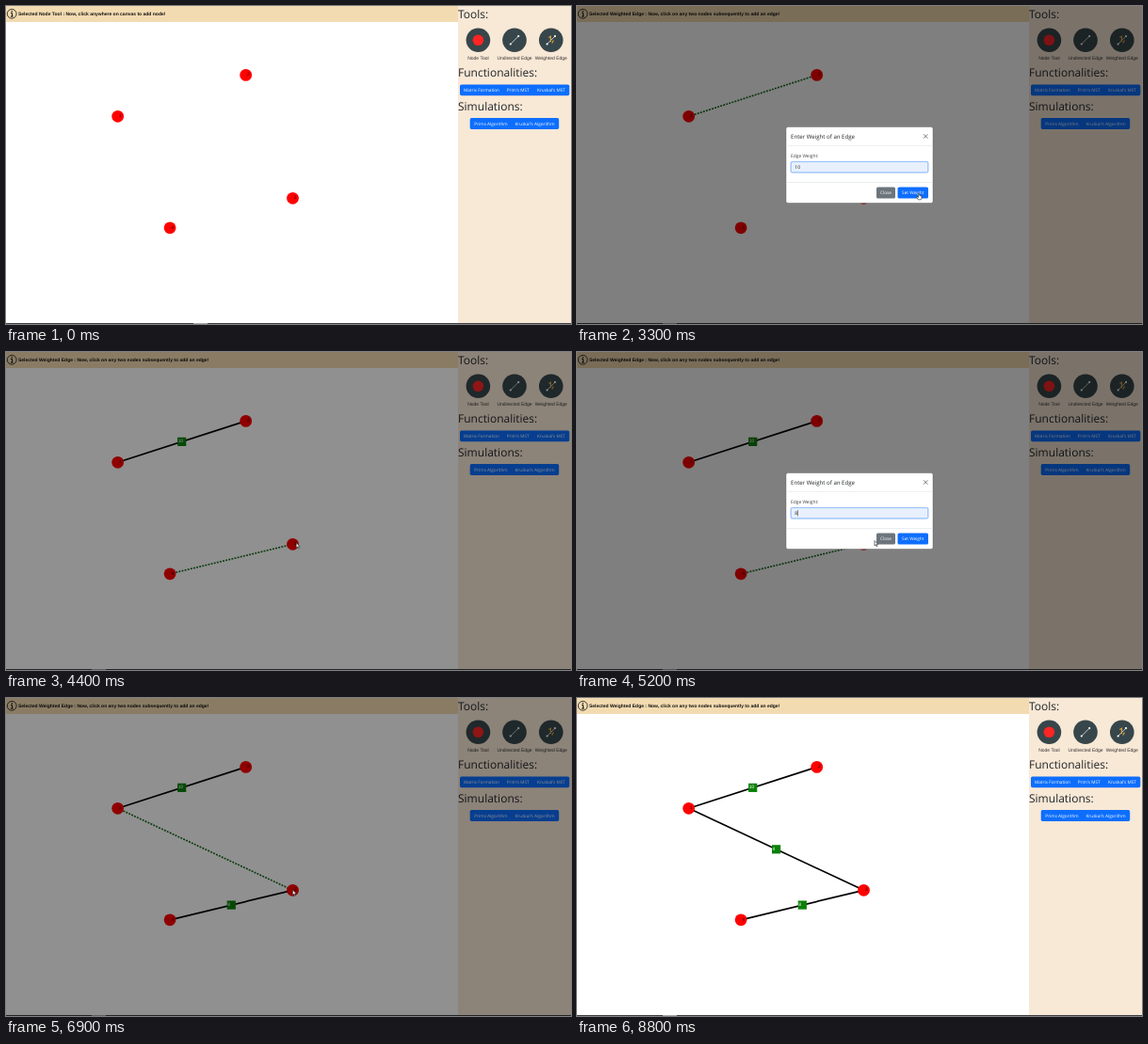
An HTML page that plays this animation: 600 px wide and 338 px high, repeating every 8900 ms.

```html
<!DOCTYPE html>
<html lang="en">
<head>
<meta charset="utf-8">
<title>Graph editor</title>
<style>
  html, body { margin: 0; width: 100%; height: 100%; overflow: hidden; background: #fff; }
  svg { display: block; width: 100vw; height: 100vh; }
  text { font-family: "Open Sans", "Noto Sans", sans-serif; font-size: 4.7px; text-rendering: geometricPrecision; }
  .arial { font-family: "Liberation Sans", Arial, sans-serif; font-size: 5px; }
  .head { font-size: 12px; font-weight: 500; fill: #212529; }
  .btn { fill: #fff; }
  .mid { text-anchor: middle; }
</style>
</head>
<body>
<svg id="stage" viewBox="0 0 600 338"></svg>
<script>
const LOOP = 8900, STEP = 100;
const svg = document.getElementById('stage');

function el(tag, attrs, parent = svg, text) {
  const node = document.createElementNS('http://www.w3.org/2000/svg', tag);
  for (const key in attrs) node.setAttribute(key, attrs[key]);
  if (text !== undefined) node.textContent = text;
  parent.appendChild(node);
  return node;
}
const box = (x, y, width, height, fill, parent, more) =>
  el('rect', { x, y, width, height, fill, ...more }, parent);
const disc = (cx, cy, r, fill, parent, more) =>
  el('circle', { cx, cy, r, fill, ...more }, parent);
const label = (x, y, str, cls, parent, more) =>
  el('text', { x, y, class: cls || '', ...more }, parent, str);
const path = (d, parent, more) => el('path', { d, fill: 'none', ...more }, parent);
const show = (node, on) => node.setAttribute('visibility', on ? 'visible' : 'hidden');
const clamp = v => Math.max(0, Math.min(1, v));

const nodes = [[118.7, 117.3], [254.7, 73.4], [304.5, 204.3], [174.1, 235.8]];
const edges = [
  { a: 0, b: 1, weight: '10', picked: 1900, open: 2000, keys: [2700, 2800], done: 3400 },
  { a: 3, b: 2, weight: '8', picked: 4200, open: 4300, keys: [5100], done: 5800 },
  { a: 0, b: 2, weight: '4', picked: 6700, open: 6800, keys: [7700], done: 8400 }
];
const TOOL_CHANGE = 900;

// Canvas, message bar and sidebar
box(0, 0, 600, 338, '#fff');
box(0, 0, 480, 17, '#f3dbb1');
box(480, 0, 120, 338, '#f8e8d6');
disc(6.2, 8.3, 4.9, 'none', svg, { stroke: '#111', 'stroke-width': .8 });
disc(6.2, 5.8, .8, '#111');
path('M5 7.6H6.6V11M4.9 11.1H7.6', svg, { stroke: '#111', 'stroke-width': 1 });
const message = label(13, 10, '', 'arial', svg, { 'font-weight': 700, fill: '#111' });

label(480, 12.5, 'Tools:', 'head');
label(480, 75, 'Functionalities:', 'head');
label(480, 110.7, 'Simulations:', 'head');

[[501.4, 'Node Tool'], [540, 'Undirected Edge'], [578.8, 'Weighted Edge']].forEach(([x, name], i) => {
  disc(x, 36.3, 12.8, '#37464a');
  if (i === 0) {
    disc(x, 36.3, 5.8, '#ff2525');
  } else {
    path(`M${x - 4} 40.3L${x + 4} 32.3`, svg, { stroke: '#e5e8e8', 'stroke-width': .8 });
    disc(x - 4.2, 40.5, 1.1, '#fff');
    disc(x + 4.2, 32.1, 1.1, '#fff');
  }
  if (i === 2) path(`M${x - 2.4} 33.4L${x - .4} 32.2V38M${x + 1} 39.5L${x + 2.6} 36.5`, svg,
    { stroke: '#d9a441', 'stroke-width': 1.2 });
  label(x, 57.3, name, 'arial mid', svg, { fill: '#333' });
});

box(482, 83.4, 116.3, 11.8, '#0d6efd', svg, { rx: 1.7 });
[[505, 'Matrix Formation'], [543.7, 'Prim\'s MST'], [579, 'Kruskal\'s MST']]
  .forEach(([x, str]) => label(x, 91.1, str, 'btn mid'));
box(492.7, 119, 94.5, 11.9, '#0d6efd', svg, { rx: 1.7 });
[[515, 'Prims Algorithm'], [561.5, 'Kruskal\'s Algorithm']]
  .forEach(([x, str]) => label(x, 126.7, str, 'btn mid'));

box(0, 337, 600, 1, '#3b3d3f');
const taskMark = box(0, 337, 15, 1, '#a5a7a9');

// Graph
for (const e of edges) {
  const [x1, y1] = nodes[e.a], [x2, y2] = nodes[e.b];
  const x = (x1 + x2) / 2, y = (y1 + y2) / 2;
  const d = `M${x1} ${y1}L${x2} ${y2}`;
  e.dots = path(d, svg, { stroke: '#12691a', 'stroke-width': 1.7, 'stroke-dasharray': '1.9 1.3' });
  e.solid = el('g', {});
  path(d, e.solid, { stroke: '#000', 'stroke-width': 1.7 });
}
nodes.forEach(([x, y], i) => {
  disc(x, y, 6.4, '#f00');
  label(x + 1.3, y + 1, i + 1, 'arial', svg, { fill: '#300' });
});
for (const e of edges) {
  const x = (nodes[e.a][0] + nodes[e.b][0]) / 2, y = (nodes[e.a][1] + nodes[e.b][1]) / 2;
  e.tag = el('g', {});
  box(x - 4.6, y - 4.6, 9.2, 9.2, '#0a800a', e.tag);
  label(x - 4, y + .7, e.weight, 'arial', e.tag, { fill: '#fff' });
}

// Dialog
const shade = box(0, 0, 600, 338, '#000');
const modal = el('g', {});
box(222, 128.5, 156, 81, '#fff', modal, { rx: 2, stroke: '#555', 'stroke-width': .4 });
label(227, 140.9, 'Enter Weight of an Edge', '', modal,
  { fill: '#212529', style: 'font-size:6.1px;font-weight:500' });
path('M368 136.3L372.4 140.7M372.4 136.3L368 140.7', modal, { stroke: '#555', 'stroke-width': .8 });
path('M222 148.4H378M222 187.5H378', modal, { stroke: '#dee2e6', 'stroke-width': .6 });
label(227, 161.2, 'Edge Weight:', '', modal, { fill: '#444', style: 'font-size:4.9px' });
box(226.4, 164.7, 147.2, 13, '#c2dbfe', modal, { rx: 2.2 });
const field = box(227.3, 165.6, 145.4, 11.2, '#fff', modal, { rx: 1.6, stroke: '#7fb0f8', 'stroke-width': .7 });
const typed = label(231.3, 173.1, '', '', modal, { fill: '#222', style: 'font-size:5px' });
const caret = box(0, 168, .5, 6.4, '#222', modal);
box(318, 192.5, 20, 12, '#6c757d', modal, { rx: 1.6 });
label(328, 200.2, 'Close', 'btn mid', modal);
box(340.5, 192.5, 32.5, 12, '#0d6efd', modal, { rx: 1.6 });
label(356.7, 200.2, 'Set Weight', 'btn mid', modal);

// Pointer
const pointer = el('g', {});
const ink = { fill: '#fff', stroke: '#222', 'stroke-width': .6, 'stroke-linejoin': 'round' };
const arrow = path('M0 0V5.4L1.3 4.2L2.2 6.2L3 5.8L2.1 3.9H3.8Z', pointer, ink);
const hand = path('M-.6 .2Q0 -.5 .6 .2V2.3L3 3V5.2L2.3 6.8H-.8L-2.3 4.2L-1.6 3.7L-.6 4.6Z', pointer, ink);

// Pointer stops: time, x, y
const stops = [
  [100, 262, 82], [300, 330, 70], [700, 577, 37], [900, 577, 37], [1500, 119, 117], [1600, 119, 117],
  [1900, 254, 75], [2500, 256, 78], [3200, 363, 199], [3300, 363, 199], [3500, 316, 196],
  [3800, 174, 236], [3900, 174, 236], [4200, 304, 204], [4700, 316, 200.5], [5200, 316, 200.5],
  [5600, 360, 199], [5700, 360, 199], [6200, 119, 117], [6300, 119, 117], [6700, 304, 204],
  [7400, 306, 204], [7800, 318, 201], [8200, 360, 199], [8300, 360, 199], [8700, 470, 260]
];

function pointerAt(t) {
  const i = Math.max(1, stops.findIndex(s => s[0] >= t));
  const [t0, x0, y0] = stops[i - 1], [t1, x1, y1] = stops[i];
  const p = clamp((t - t0) / (t1 - t0)), k = p * p * (3 - 2 * p);
  return [x0 + (x1 - x0) * k, y0 + (y1 - y0) * k];
}

function drawPointer(t, dialog) {
  const on = t >= 100 && t < 8700;
  show(pointer, on);
  if (!on) return;
  const [x, y] = pointerAt(t);
  const overNode = !dialog && nodes.some(n => Math.hypot(n[0] - x, n[1] - y) < 6);
  const overButton = dialog && x > 318 && x < 373 && y > 192 && y < 205;
  const overTool = !dialog && Math.hypot(x - 578.8, y - 36.3) < 13;
  const isHand = overNode || overButton || overTool;
  pointer.setAttribute('transform', `translate(${x} ${y})`);
  arrow.setAttribute('opacity', isHand ? 0 : 1);
  hand.setAttribute('opacity', isHand ? 1 : 0);
}

function draw(t) {
  message.textContent = t < TOOL_CHANGE
    ? 'Selected Node Tool : Now, click anywhere on canvas to add node!'
    : 'Selected Weighted Edge : Now, click on any two nodes subsequently to add an edge!';
  taskMark.setAttribute('x', t < TOOL_CHANGE ? 199 : 91);

  for (const e of edges) {
    show(e.dots, t >= e.picked && t < e.done);
    show(e.solid, t >= e.done);
    show(e.tag, t >= e.done);
  }

  const e = edges.find(e => t > e.open && t <= e.done);
  show(shade, e);
  show(modal, e && t < e.done);
  if (e) {
    const age = t - e.open;
    shade.setAttribute('opacity', t === e.done ? .25 : .5 * clamp(age / 115));
    const k = clamp((age - 100) / 200);
    modal.setAttribute('opacity', k);
    modal.setAttribute('transform', `translate(0 ${-8 * (1 - k)})`);
    const count = e.keys.filter(k => t >= k).length;
    typed.textContent = e.weight.slice(0, count);
    field.setAttribute('fill', count ? '#e8f0fe' : '#fff');
    caret.setAttribute('x', 231.5 + count * 2.86);
    caret.setAttribute('opacity', Math.floor((t - e.keys[0] + 2000) / 500) % 2 ? 0 : 1);
  }
  drawPointer(t, e);
}

const start = performance.now();
function tick(now) {
  const t = Math.max(0, now - start) % LOOP;
  draw(Math.floor(t / STEP) * STEP);
  requestAnimationFrame(tick);
}
draw(0);
requestAnimationFrame(tick);
</script>
</body>
</html>
```
